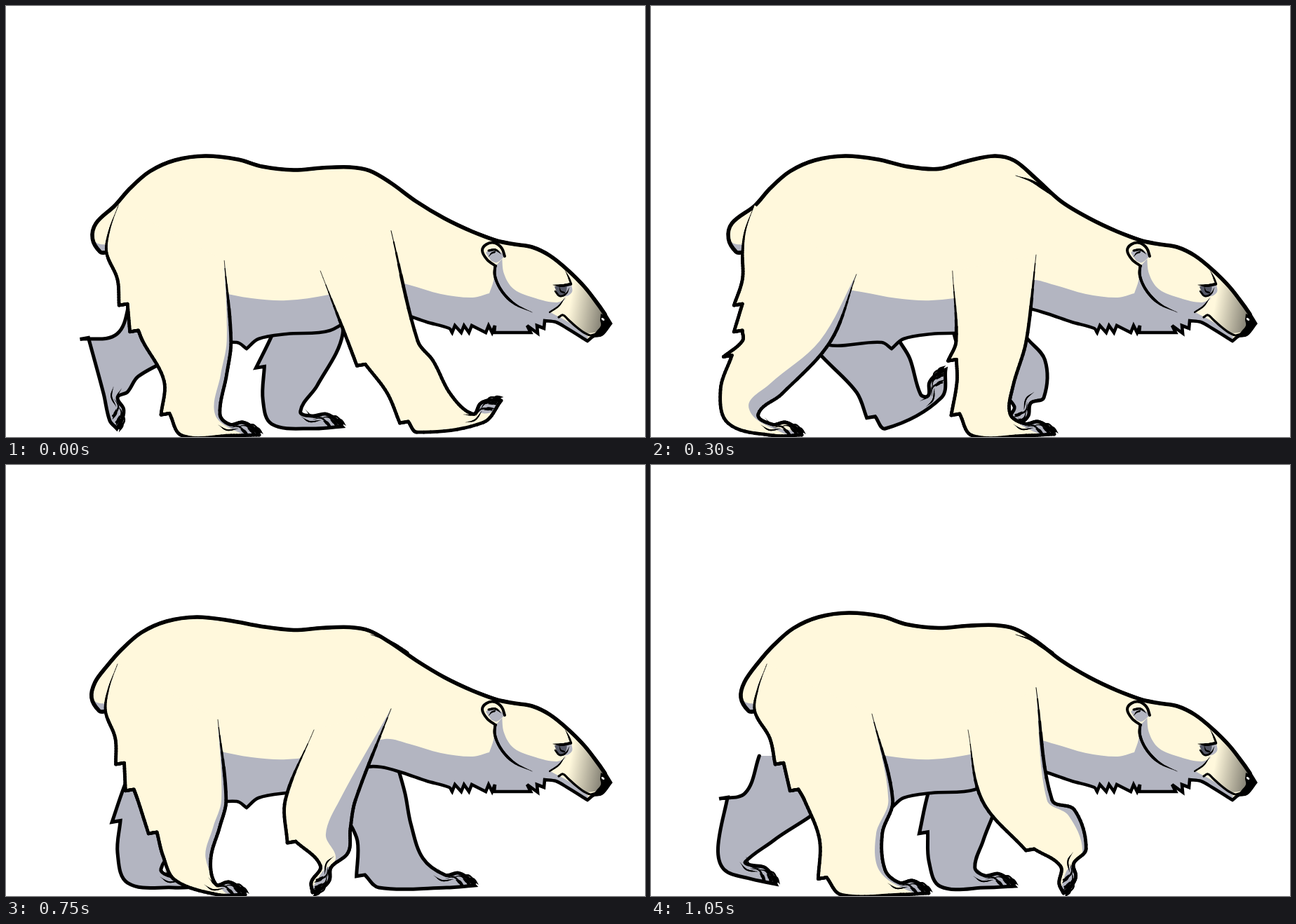
Recreate the animation shown at these times as an HTML page with a canvas. Size 911 px wide and 615 px high, loop 1.2 s.

```html
<!DOCTYPE html>
<html lang="en">
<head>
<meta charset="utf-8">
<title>Walking polar bear</title>
<style>
html, body { margin: 0; width: 100%; height: 100%; overflow: hidden; background: #fff; }
canvas { display: block; }
</style>
</head>
<body>
<canvas id="stage" width="911" height="615"></canvas>
<script>
const ctx = document.getElementById('stage').getContext('2d');
const CREAM = '#fff8dc', GREY = '#b3b5c1', INK = '#000';
const STEP = 150, POSES = 8, FLOOR = 613, HIP_Y = 478;

const clamp = (v, lo, hi) => Math.min(hi, Math.max(lo, v));
const lerp = (p, q, t) => [p[0] + (q[0] - p[0]) * t, p[1] + (q[1] - p[1]) * t];
const sharp = p => [p[0], p[1], true];

// One cycle per loop, highest at the given pose.
const wave = (k, peak) => Math.cos((k - peak) * 2 * Math.PI / POSES);

// "x,y" pairs; a trailing "!" marks a sharp corner.
const read = text => text.split(' ').map(s => [...s.split(',').map(parseFloat), s.endsWith('!')]);

const CROWN = read('700,335 725,340 750,344 775,356 800,376 825,401 845,427 854,440!');
const CHIN = read('862,453! 849,469 838,471 829,478! 800,460 784,451 768,449! 767,460! 757,456! 758,467! 743,456! 748,466!');
const BELLY = read('632,460 600,451 565,439 535,431 512,432 462,463 400,468 360,475 343,489! 329,480 240,480 215,430 180,370');
const SHADE = read('240,398! 300,408 350,417 400,420 460,412 540,391 575,398 620,411 665,416 689,410! 695,392 697,368! 707,356! 710,382 724,404 755,417 785,423 799,417! 776,437! 805,453 830,472! 826,482! 760,500! 240,500!');

// Each row of keys: knee x y, ankle x y, toe x y, ankle half width.
const HIND = {
  hip: k => 236 + 48 * wave(k, 6.6), hipWidth: 63, kneeWidth: 45,
  tip: k => [302 + 13 * wave(k, 7), 369 - 15 * wave(k, 6.5)],
  shade: (hip, ankle) => clamp(0.25 + (hip[0] - ankle[0]) / 200, 0.05, 0.5),
  offset: [7, -10],
  keys: [
    [270, 530, 269, 582, 361, 612, 36], [198, 534, 183, 575, 271, 612, 33],
    [151, 526, 126, 565, 215, 612, 32], [135, 515, 108, 566, 171, 608, 22],
    [146, 511, 149, 562, 151, 613, 17], [260, 520, 258, 560, 341, 613, 34],
    [324, 537, 345, 580, 413, 529, 36], [285, 530, 292, 583, 396, 611, 42]
  ]
};
const FORE = {
  hip: k => 485 + 52 * wave(k, 0), hipWidth: 50, kneeWidth: 40,
  tip: k => [549, 342 - 25 * wave(k, 7.3)],
  rearTip: k => [439 + 13 * wave(k, 7), 378],
  shade: (hip, ankle, toe) => clamp((hip[0] - toe[0] + 75) / 30, 0, 0.9),
  offset: [-3, -10],
  keys: [
    [576, 529, 604, 574, 706, 563, 36], [542, 534, 556, 583, 671, 610, 43],
    [476, 540, 476, 582, 575, 611, 36], [437, 540, 432, 580, 521, 611, 33],
    [409, 538, 396, 580, 482, 610, 28], [452, 528, 468, 562, 437, 610, 22],
    [530, 535, 542, 575, 516, 611, 22], [575, 520, 602, 560, 588, 611, 22]
  ]
};

// Splits a smooth line into bezier spans; handles follow the neighbours.
function spans(pts) {
  const handle = (from, a, c, len) => {
    const d = Math.hypot(c[0] - a[0], c[1] - a[1]) || 1;
    return [from[0] + (c[0] - a[0]) * len / d, from[1] + (c[1] - a[1]) * len / d];
  };
  return pts.slice(1).map((q, i) => {
    const p = pts[i];
    const a = p[2] || !i ? p : pts[i - 1];
    const c = q[2] || i + 2 >= pts.length ? q : pts[i + 2];
    const len = Math.hypot(q[0] - p[0], q[1] - p[1]) / 3;
    return [p, handle(p, a, q, len), handle(q, p, c, -len), q];
  });
}

function trace(pts) {
  ctx.beginPath();
  ctx.moveTo(pts[0][0], pts[0][1]);
  for (const [, a, b, q] of spans(pts)) ctx.bezierCurveTo(...a, ...b, q[0], q[1]);
}

function fill(pts, color) {
  trace(pts);
  ctx.fillStyle = color;
  ctx.fill();
}

function stroke(pts, width, closed) {
  trace(pts);
  if (closed) ctx.closePath();
  ctx.lineWidth = width;
  ctx.stroke();
}

// A line with a fine start, and a fine end too when both is set.
function taper(pts, width, reach = 40, both = false) {
  const dots = [pts[0]];
  for (const [p, a, b, q] of spans(pts)) {
    for (let j = 1; j <= 10; j++) {
      const t = j / 10, ab = lerp(a, b, t);
      dots.push(lerp(lerp(lerp(p, a, t), ab, t), lerp(ab, lerp(b, q, t), t), t));
    }
  }
  const run = [0];
  for (let i = 1; i < dots.length; i++) {
    run.push(run[i - 1] + Math.hypot(dots[i][0] - dots[i - 1][0], dots[i][1] - dots[i - 1][1]));
  }
  const total = run[run.length - 1];
  for (let i = 1; i < dots.length; i++) {
    const d = both ? Math.min(run[i], total - run[i]) : run[i];
    ctx.lineWidth = width * clamp(d / reach, 0.15, 1);
    ctx.beginPath();
    ctx.moveTo(dots[i - 1][0], dots[i - 1][1]);
    ctx.lineTo(dots[i][0], dots[i][1]);
    ctx.stroke();
  }
}

// A pointed lock of fur on a rear edge that is followed upwards.
const tuft = ([x, y]) => [[x, y, true], [x - 12, y + 2, true]];

const rumpX = k => 139 + 0.2 * (HIND.hip(k) - 236);

function footAngle(ankle, toe) {
  const a = Math.atan2(toe[1] - ankle[1], toe[0] - ankle[0]) - 0.28;
  if (Math.abs(a) < 0.29) return 0;
  return a < 0 ? a - 0.4 : a;
}

function buildLeg(kind, k) {
  const [kx, ky, ax, ay, tx, ty, w] = kind.keys[k];
  const hip = [kind.hip(k), HIP_Y], knee = [kx, ky], ankle = [ax, ay], toe = [tx, ty];
  const angle = footAngle(ankle, toe), cos = Math.cos(angle), sin = Math.sin(angle);
  const local = (x, y) => [tx + x * cos - y * sin, Math.min(FLOOR, ty + x * sin + y * cos)];
  const side = (at, from, to, width) => s => {
    const d = Math.hypot(to[0] - from[0], to[1] - from[1]);
    return [at[0] + (to[1] - from[1]) / d * width * s, at[1] - (to[0] - from[0]) / d * width * s];
  };
  const atHip = s => [hip[0] + kind.hipWidth * s, HIP_Y];
  const atKnee = side(knee, hip, ankle, kind.kneeWidth);
  const atAnkle = side(ankle, knee, ankle, w);
  const stations = [atHip, atKnee, atAnkle];

  const sole = angle > 1 ? [local(-14, 6)]
    : [local(-40, 4), [ax - 0.5 * w, Math.min(FLOOR, ay + 0.95 * w)]];
  const broad = w > 35;
  const heel = atAnkle(-1), back = atKnee(-1);
  const lower = [
    ...stations.map(f => f(1)),
    local(-42, -15), local(-24, -18), local(-11, -12), sharp(toe), ...sole,
    ...(broad ? tuft(heel) : [heel]),
    ...(broad ? [back] : tuft(back)),
    ...(broad && kind === FORE ? tuft(lerp(back, atHip(-1), 0.55)) : []),
    atHip(-1)
  ];
  const rump = [rumpX(k), 352];
  const upper = kind === FORE ? [kind.rearTip(k)] : [
    ...tuft(lerp(atHip(-1), rump, 0.12)), ...tuft(lerp(atHip(-1), rump, 0.42)),
    lerp(atHip(-1), rump, 0.7), rump, [rump[0] + 4, 320], [rump[0] + 17, 284]
  ];
  const amount = kind.shade(hip, ankle, toe);
  const shade = [
    kind.tip(k), ...stations.map((f, i) => f(1 - amount * (i ? 1 : 0.5))), local(-30, -4), toe,
    ...stations.map(f => f(1.5)).reverse()
  ];
  return { lower, outline: [kind.tip(k), ...lower, ...upper], shade, toe, angle };
}

function drawToes({ toe, angle }) {
  ctx.save();
  ctx.translate(...toe);
  ctx.rotate(angle);
  for (let i = 0; i < 3; i++) {
    ctx.save();
    ctx.translate(i * 10 - 21, -i * 1.5);
    taper(read('-20,-10 -9,-12 -2,-7 2,0'), 2.2, 15);
    fill(read('-6,-8! 1,-7 7,2! -2,-3!'), INK);
    ctx.restore();
  }
  taper(read('-30,-9 -46,-7 -58,-14'), 2, 10, true);
  taper(read('-28,-14 -42,-14 -52,-24'), 2, 10, true);
  ctx.restore();
}

function drawFarLeg(kind, k) {
  const leg = buildLeg(kind, (k + POSES / 2) % POSES);
  const front = leg.lower[0], rear = leg.lower[leg.lower.length - 1];
  const shape = [[front[0] - 15, 425, true], ...leg.lower, [rear[0] + 20, 425, true]];
  ctx.save();
  ctx.translate(...kind.offset);
  fill(shape, GREY);
  stroke(shape, 5);
  drawToes(leg);
  ctx.restore();
}

function drawNearLeg(kind, k) {
  const leg = buildLeg(kind, k);
  fill(leg.outline, CREAM);
  ctx.save();
  ctx.clip();
  fill(leg.shade, GREY);
  ctx.restore();
  taper(leg.outline, 4.8, 80, true);
  drawToes(leg);
}

// Tail, rump and back, from the rump line to the neck.
function buildBack(k) {
  const rump = rumpX(k), sway = 144 + 7 * wave(k, 0);
  const bob = 3 * wave(2 * k, 2);
  const lift = 16 * Math.exp(-1.5 * (k - 2) ** 2);
  const tail = [[0, 352, true], [-9, 351], [-20, 332], [-15, 310]].map(([x, y]) => [rump + x, y]);
  const croup = [[4, 285], [26, 260], [54, 236], [90, 220], [133, 214], [180, 219]]
    .map(([x, y]) => [sway + x, y + bob]);
  const withers = [[365, 229, 0], [410, 234, 0.1], [450, 231, 0.6], [490, 230, 1], [518, 235, 0.9], [548, 252, 0.4]]
    .map(([x, y, share]) => [x, y + bob / 2 - lift * share]);
  return [...tail, ...croup, ...withers, [585, 279], [625, 303], [665, 322]];
}

function buildJaw() {
  const fur = [];
  for (const x of [697, 688, 664, 653, 640]) fur.push([x, 456, true], [x - 4, 466, true]);
  return [...CHIN, [696, 466, true], ...fur];
}

function drawMuzzle() {
  const g = ctx.createLinearGradient(804, 424, 850, 432);
  g.addColorStop(0, 'rgba(118,115,104,0)');
  g.addColorStop(1, 'rgba(118,115,104,.85)');
  fill(read('797,370! 870,430! 865,465! 845,465! 826,466 805,450 794,440! 800,410!'), g);
}

function drawTorso(k) {
  const back = buildBack(k);
  const outline = [...CROWN, ...buildJaw(), ...BELLY, ...back];
  fill(outline, CREAM);
  ctx.save();
  ctx.clip();
  fill(SHADE, GREY);
  const x = rumpX(k);
  fill([[x - 25, 325, true], [x - 14, 338], [x + 2, 341, true], [x, 365, true], [x - 30, 360, true]], GREY);
  drawMuzzle();
  ctx.restore();
  stroke(outline, 4.6, true);
  stroke([...back, ...CROWN], 5.6);
  if (k % 4) taper(read('520,242 543,250 572,268'), 5);
}

function drawEar() {
  const rim = read('698,371 686,362 679,349 685,340 697,338 707,346 711,357');
  fill(rim, CREAM);
  fill(read('684,352 692,346 703,349 711,357! 700,366 692,364'), GREY);
  stroke(rim, 4);
  taper(read('706,354 698,348 688,349'), 3, 10);
  taper(read('688,358 692,353 697,351'), 2, 8);
}

function drawFace() {
  taper(read('750,437 725,425 707,407 697,385 698,366'), 4);
  fill(read('782,400! 806,397! 807,408 799,414 788,413'), GREY);
  fill(read('782,400! 800,399! 798,409 791,413 785,409'), '#555866');
  taper(read('803,402 799,410 790,414 783,407'), 2.5, 12);
  taper(read('789,401 791,407 796,409'), 2, 8);
  taper(read('797,377 802,387 806,397'), 2.5, 15);
  taper(read('780,398 792,399 805,397'), 3.8, 12);
  taper(read('797,416 788,428 775,437'), 2.2, 15);
  stroke(read('788,444 794,441 801,447 812,457 824,466 834,470 847,465'), 3.2);
  fill(read('848,439! 856,443 864,453! 855,461 848,471 836,472! 842,464 848,456 847,448'), INK);
  ctx.fillStyle = '#fff';
  ctx.beginPath();
  ctx.ellipse(851, 447, 2.5, 1.5, 0.6, 0, 7);
  ctx.fill();
}

function drawBear(k) {
  drawFarLeg(HIND, k);
  drawFarLeg(FORE, k);
  drawTorso(k);
  drawNearLeg(HIND, k);
  drawNearLeg(FORE, k);
  drawFace();
  drawEar();
}

const start = performance.now();
let shown = -1;

function frame() {
  const k = Math.floor((performance.now() - start) / STEP) % POSES;
  if (k !== shown) {
    shown = k;
    ctx.fillStyle = '#fff';
    ctx.fillRect(0, 0, 911, 615);
    ctx.strokeStyle = INK;
    ctx.lineCap = 'round';
    ctx.miterLimit = 3;
    drawBear(k);
  }
  requestAnimationFrame(frame);
}
frame();
</script>
</body>
</html>
```
